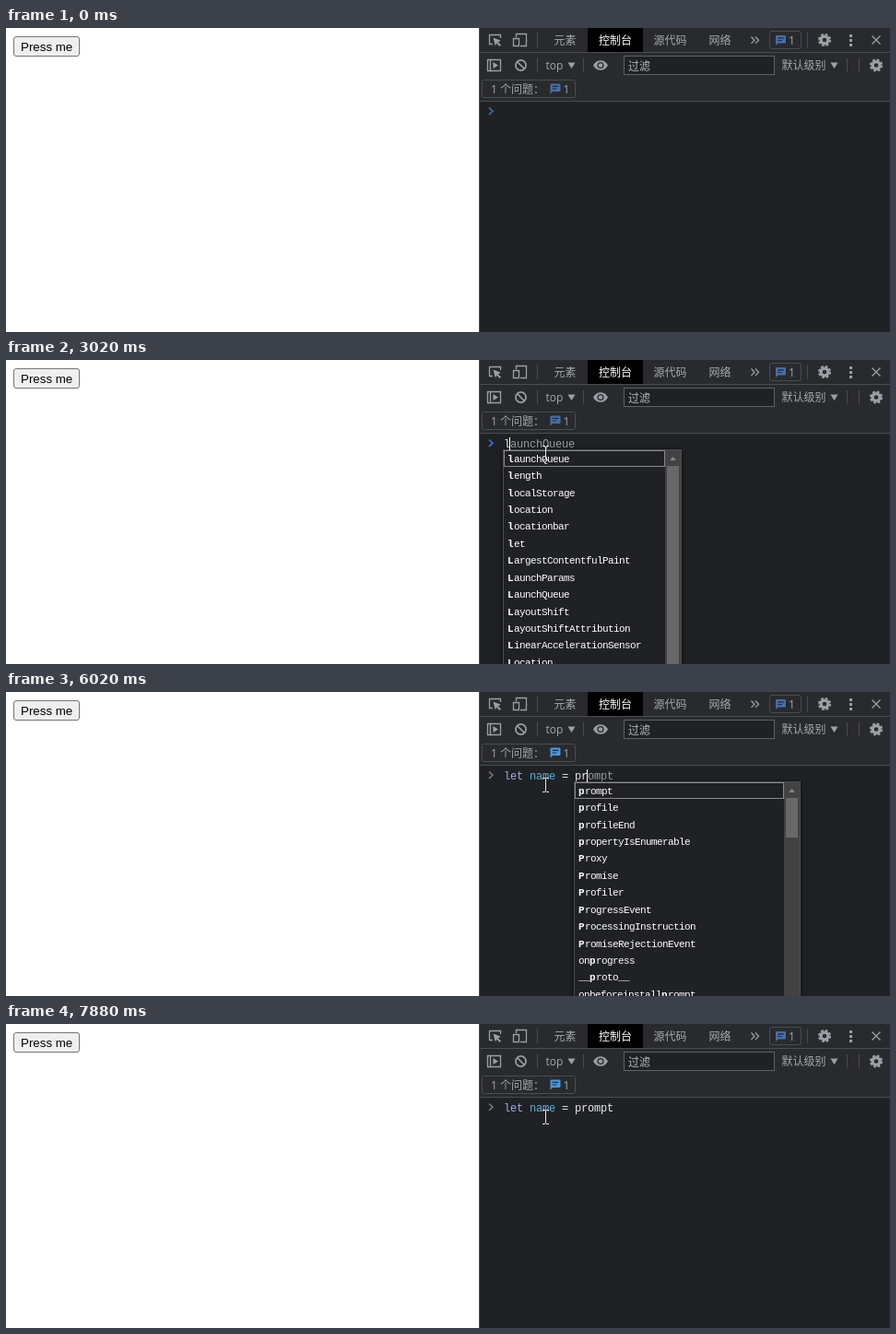
An HTML page that plays this animation: 959 by 330 pixels, repeating every 8 s.

```html
<!DOCTYPE html>
<html lang="zh">
<head>
<meta charset="utf-8">
<title>Console typing</title>
<style>
  html, body { margin: 0; width: 100%; height: 100%; overflow: hidden; background: #fff; }
  svg { display: block; width: 959px; height: 330px; }
  text { white-space: pre; }
  .ui { font: 12px "Open Sans", "Noto Sans CJK SC", "Noto Sans CJK", sans-serif; fill: #a3a9af; }
  .btn { font: 13.333px "Liberation Sans", Arial, sans-serif; fill: #000; }
  .code { font: 12px "Liberation Mono", monospace; letter-spacing: -.2px; fill: #e8eaed; }
  .item { font: 11px "Liberation Mono", monospace; letter-spacing: -.6px; fill: #fff; }
  .item .hit { font-weight: bold; letter-spacing: .4px; }
  .line { fill: none; stroke: #9aa0a6; stroke-width: 1.3; }
  .rule { fill: none; stroke: #494c50; }
  .fill { fill: #9aa0a6; }
  .pop { filter: drop-shadow(0 1px 3px rgba(0, 0, 0, .6)); }
</style>
</head>
<body>
<svg viewBox="0 0 959 330">
  <defs>
    <g id="gear">
      <circle r="3.9" fill="none" stroke="#9aa0a6" stroke-width="3.2"/>
      <circle r="6" fill="none" stroke="#9aa0a6" stroke-width="2.2" stroke-dasharray="2.7 2.012"/>
    </g>
    <g id="note">
      <path d="M1 0h9q1 0 1 1v6.5q0 1-1 1H2.5L0 11V1q0-1 1-1z"/>
      <path d="M2.2 2.9h6.6M2.2 5.5h4.6" stroke="#292a2d" stroke-width="1.1"/>
    </g>
  </defs>

  <rect width="959" height="330" fill="#fff"/>
  <rect x="8.5" y="9.5" width="71" height="21" rx="2.5" fill="#efefef" stroke="#767676"/>
  <text class="btn" x="16" y="25">Press me</text>

  <rect x="513" width="446" height="330" fill="#202124"/>
  <rect x="513" width="446" height="79" fill="#292a2d"/>
  <rect x="631" width="60" height="26" fill="#000"/>
  <path class="rule" d="M513.5 0V330M513 26.5H959M513 79.5H959M576.5 5v16M869.5 5v16M576.5 33v15M626.5 33v15M912.5 33v15M925.5 33v15"/>

  <!-- tab bar -->
  <path class="line" d="M528 17.5H524.5V7.5H536.5V11"/>
  <path class="fill" d="M528.5 10.5l8.5 3.2-3.3 1.5 3.3 3.3-1.4 1.4-3.3-3.3-1.4 3z"/>
  <path class="line" d="M553.5 10V6.5H564.5V19.5H558M550.5 11.5h6v8h-6z"/>
  <g class="ui">
    <text x="594.5" y="17.5">元素</text>
    <text x="643" y="17.5" fill="#fff">控制台</text>
    <text x="702.5" y="17.5">源代码</text>
    <text x="762.5" y="17.5">网络</text>
    <text x="849" y="17.5">1</text>
    <text x="585.5" y="45">top</text>
    <text x="841.5" y="45">默认级别</text>
    <text x="526" y="71">1 个问题：</text>
    <text x="604.5" y="71">1</text>
  </g>
  <path class="line" d="M808.5 9.5l3.5 3.7-3.5 3.7M813 9.5l3.5 3.7-3.5 3.7"/>
  <rect class="rule" x="828.5" y="3.5" width="34" height="19" rx="2"/>
  <use href="#note" x="835" y="8" fill="#456ea9"/>
  <use href="#gear" x="888" y="13"/>
  <path class="fill" d="M915 7h3v3h-3zM915 12h3v3h-3zM915 17h3v3h-3z"/>
  <path class="line" d="M939.5 8.5l9 9M948.5 8.5l-9 9"/>

  <!-- filter bar -->
  <path class="line" d="M522.5 34.5h14v12h-14zM525.5 34.5v12"/>
  <path class="fill" d="M528.5 37v7l5.5-3.5z"/>
  <circle class="line" cx="558.5" cy="40.5" r="5.6" style="stroke-width:1.7"/>
  <path class="line" style="stroke-width:1.7" d="M554.5 36.5l8 8"/>
  <path class="fill" d="M609.5 37.5h8l-4 6.5zM894.5 37.5h8l-4 6.5z"/>
  <path class="fill" d="M637 40.5q3-5.3 8-5.3t8 5.3q-3 5.3-8 5.3t-8-5.3z"/>
  <circle cx="645" cy="40.5" r="3.6" fill="#292a2d"/>
  <circle class="fill" cx="645" cy="40.5" r="2.2"/>
  <rect x="670.5" y="30.5" width="163" height="20" fill="#202124" stroke="#5c6065"/>
  <text class="ui" x="675" y="45.5" style="fill:#b4b8bd">过滤</text>
  <use href="#gear" x="944" y="40.5"/>

  <rect class="rule" x="516.5" y="56.5" width="101" height="19" rx="2"/>
  <use id="badge" href="#note" x="590.5" y="60.5"/>

  <path id="mark" d="M524 86.5l4 3.7-4 3.7" fill="none" stroke-width="1.5"/>
  <text class="code" x="540" y="95" id="code"></text>
  <g class="pop" id="pop"></g>
  <rect id="caret" y="84" width="1" height="14" fill="#fff"/>
  <circle id="halo" cx="583" cy="100" r="12" fill="#8f8b14"/>
  <path id="mouse" d="M-3.5-7.5h3M.5-7.5h3M-3.5 7.5h3M.5 7.5h3M0-7V7" fill="none" stroke="#e4e4e4"/>
</svg>

<script>
const LOOP = 8000, TICK = 60, ROW = 18.42;
const $ = id => document.getElementById(id);
const [badge, mark, code, pop, caret, halo, mouse] =
  ['badge', 'mark', 'code', 'pop', 'caret', 'halo', 'mouse'].map($);

const keys = [
  [2900, 'l'], [3140, 'le'], [3260, 'let'], [3440, 'let '],
  [3920, 'let n'], [4040, 'let na'], [4100, 'let nam'], [4220, 'let name'],
  [4820, 'let name '], [5060, 'let name ='], [5180, 'let name = '],
  [5900, 'let name = p'], [6020, 'let name = pr'], [6080, 'let name = pro'],
  [7280, 'let name = prompt']
];
const caretOff = [[0, 2060], [2720, 2900], [5720, 5900], [6620, 6740], [7880, LOOP]];
const past = ['let name', 'let name = prompt()'];
const lWords = ('launchQueue length localStorage location locationbar let LargestContentfulPaint ' +
  'LaunchParams LaunchQueue LayoutShift LayoutShiftAttribution LinearAccelerationSensor Location').split(' ');
const pWords = ('prompt profile profileEnd propertyIsEnumerable Proxy Promise Profiler ProgressEvent ' +
  'ProcessingInstruction PromiseRejectionEvent onprogress __proto__ onbeforeinstallprompt').split(' ');

const textAt = t => keys.reduce((s, [at, v]) => t >= at ? v : s, '');
const lastWord = s => s.slice(s.lastIndexOf(' ') + 1);
const box = (x, y, w, h, attrs) => `<rect x="${x}" y="${y}" width="${w}" height="${h}" ${attrs}/>`;
const frame = (x, y, w, h) => box(x + .5, y + .5, w - 1, h - 1, 'fill="#202124" stroke="#494c50"');
const focus = (x, y, w, h) =>
  box(x + .5, y + .5, w - 1, h - 1, 'fill="none" stroke="#f0f0f0" stroke-dasharray="1 1"');

function item(x, y, s, from, n) {
  return `<text class="item" x="${x}" y="${y}">${s.slice(0, from)}` +
    `<tspan class="hit">${s.slice(from, from + n)}</tspan>${s.slice(from + n)}</text>`;
}

function wordsFor(s) {
  const w = lastWord(s).toLowerCase();
  return (s.includes('=') ? pWords : lWords).filter(v => v.toLowerCase().includes(w));
}

function wordPopup(s, x, width, thumb) {
  const list = wordsFor(s), w = lastWord(s).toLowerCase();
  const long = list.length > 12, inner = width - (long ? 18 : 1);
  let out = frame(x - 1, 97, width + 1, long ? 240 : list.length * ROW + 2) + focus(x, 98, inner, 18);
  list.forEach((v, i) => {
    out += item(x + 4, 110.8 + i * ROW, v, v.toLowerCase().indexOf(w), w.length);
  });
  if (long) {
    const sx = x + inner;
    out += box(sx, 98, 17, 232, 'fill="#424242"') + box(sx + 2, 115, 13, thumb, 'fill="#686868"') +
      `<path d="M${sx + 5} 109h7l-3.5-4z" fill="#868686"/>`;
  }
  return out;
}

function pastPopup(s) {
  const list = past.filter(v => v.startsWith(s.trimEnd()) && v.length >= s.length);
  const top = 84 - list.length * 18.5;
  let out = frame(539, Math.floor(top) - 1, 194, 86 - Math.floor(top));
  list.forEach((v, i) => {
    const y = Math.floor(top + i * 18.5), n = s.length;
    if (!i) out += focus(540, y, 192, 19);
    out += `<path d="M545 ${y + 5.5}l4.5 4-4.5 4" fill="none" stroke="${i ? '#6d9bf2' : '#fff'}" stroke-width="1.4"/>`;
    out += item(728 - n * 7 - (v.length - n) * 6, y + 13, v, 0, n);
  });
  return out;
}

function popupFor(s, t) {
  if (!s || s.endsWith('prompt')) return '';
  if (s.startsWith('let ') && s.length < 12) return pastPopup(s);
  return s.includes('=') ? wordPopup(s, 617, t < 6200 ? 245 : 168, 43) : wordPopup(s, 540, 193, 215);
}

function codeFor(s, late) {
  const span = (v, c) => v ? `<tspan fill="${c}">${v}</tspan>` : '';
  const parts = s.startsWith('let')
    ? span('let', late ? '#9dabe4' : '#9a80e4') + span(s.slice(3, 8), '#5db0d7') + s.slice(8)
    : s;
  const w = lastWord(s), listing = s === 'l' || s === 'le' || s.length > 11;
  const ghost = listing ? wordsFor(s)[0].slice(w.length) : '';
  return parts + span(ghost, '#9a9da6');
}

function show(el, on) { el.style.display = on ? '' : 'none'; }

let lastKey;
function draw(t) {
  const s = textAt(t), shown = textAt(t - TICK), late = t >= 5900;
  const key = [s, shown, late, t < 6200].join('|');
  if (key !== lastKey) {
    code.innerHTML = codeFor(s, late);
    pop.innerHTML = popupFor(shown, t);
    lastKey = key;
  }
  badge.setAttribute('fill', late ? '#4b96dc' : '#456ea9');
  mark.setAttribute('stroke', t < 2900 ? '#4472b4' : t < 5060 ? '#3f7ae6' : '#777b80');

  caret.setAttribute('x', 539 + s.length * 7);
  show(caret, !caretOff.some(([a, b]) => t >= a && t < b));
  show(halo, t >= 1940 && t < 2060);

  const step = Math.floor((t - 200) / TICK) * TICK;
  const left = (1 - Math.min(1, Math.max(0, step / 660))) ** 2;
  mouse.setAttribute('transform',
    `translate(${Math.round(585 + 60 * left) + .5} ${Math.round(101 + 200 * left)})`);
  show(mouse, t >= 200);
}

const start = performance.now();
function loop() {
  draw((performance.now() - start) % LOOP);
  requestAnimationFrame(loop);
}
loop();
</script>
</body>
</html>
```
